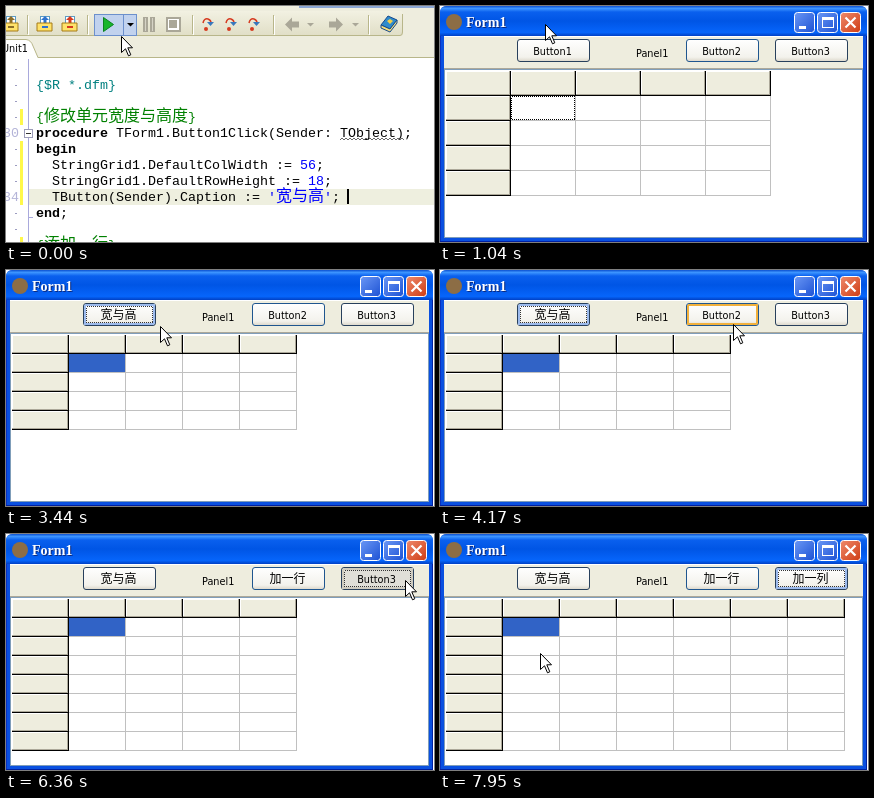
These frames come from a looping animation (428x236 px, 8 s). An HTML page:

```html
<!DOCTYPE html>
<html lang="zh">
<head>
<meta charset="utf-8">
<title>StringGrid demo</title>
<style>
html, body { margin: 0; width: 100%; height: 100%; overflow: hidden; background: #fff; }
svg { display: block; width: 100%; height: 100%; }
rect { shape-rendering: crispEdges; }
rect.soft { shape-rendering: auto; }
.code { font: 13.33px "Liberation Mono", monospace; }
.code .cjk { font: 16px "Noto Sans CJK SC", "Noto Sans CJK", sans-serif; }
.ui { font: 9.7px "DejaVu Sans", sans-serif; }
.ui.cjk { font: 12px "Noto Sans CJK SC", "Noto Sans CJK", sans-serif; }
.title { font: bold 14px "Liberation Serif", serif; }
.key { font-weight: bold; }
.lit { fill: #00f; }
.note { fill: #008000; }
.dir { fill: #008080; }
.num { fill: #b4b4d8; }
</style>
</head>
<body>
<svg viewBox="0 0 428 236" preserveAspectRatio="none">
  <defs>
    <linearGradient id="bar" x2="0" y2="1"><stop stop-color="#f2f1e2"/><stop offset="1" stop-color="#e0dec6"/></linearGradient>
    <linearGradient id="caption" x2="0" y2="1">
      <stop stop-color="#0a4fd0"/><stop offset=".08" stop-color="#3d95ff"/><stop offset=".2" stop-color="#0a60ee"/>
      <stop offset=".5" stop-color="#0055e5"/><stop offset=".88" stop-color="#0665fb"/><stop offset="1" stop-color="#0040c4"/>
    </linearGradient>
    <linearGradient id="face" x2="0" y2="1"><stop stop-color="#fff"/><stop offset=".8" stop-color="#f3f2ec"/><stop offset="1" stop-color="#dcd7ca"/></linearGradient>
    <linearGradient id="blueBox" x2="1" y2="1"><stop stop-color="#6a97f5"/><stop offset="1" stop-color="#1d52d4"/></linearGradient>
    <linearGradient id="redBox" x2="1" y2="1"><stop stop-color="#ee8a6c"/><stop offset="1" stop-color="#cf3c14"/></linearGradient>
  </defs>
  <g id="scene"></g>
  <path id="cursor" d="M.5.5V16.5L4.5 12.8L7.5 19.8L9.8 18.8L6.8 11.8H11.5Z" fill="#fff" stroke="#000"/>
</svg>
<script>
const LOOP = 8000;
const PANEL = '#eeedde';
const OLIVE = '#b8b68a';
const GREY = '#aaa798';
const sceneNode = document.getElementById('scene');
const cursorNode = document.getElementById('cursor');

const rect = (x, y, w, h, fill, extra = '') =>
  `<rect x="${x}" y="${y}" width="${w}" height="${h}" fill="${fill}" ${extra}/>`;
const path = (d, fill, extra = '') => `<path d="${d}" fill="${fill}" ${extra}/>`;
const line = (d, stroke, extra = '') => path(d, 'none', `stroke="${stroke}" ${extra}`);
const text = (x, y, cls, content, extra = '') =>
  `<text x="${x}" y="${y}" class="${cls}" ${extra}>${content}</text>`;
const span = (cls, content) => `<tspan class="${cls}">${content}</tspan>`;
const repeat = (n, draw) => Array.from({ length: n }, (_, i) => draw(i)).join('');

// Pointer moves: start, end, step count, from, control, to
const moves = [
  [200, 200, 1, [115, 30], [110, 24], [105, 18]],
  [1370, 1730, 7, [105, 18], [125, 30], [144, 47]],
  [1990, 2120, 2, [144, 47], [144, 48], [143, 48]],
  [3440, 4230, 13, [143, 48], [215, 101], [307, 46]],
  [5800, 6100, 6, [307, 46], [353, 42], [399, 46]],
  [7350, 7950, 11, [399, 46], [240, 180], [100, 119]]
];

function pointer(t) {
  const move = moves.filter(m => t >= m[0]).pop();
  if (!move) return moves[0][3];
  const [start, end, steps, a, b, c] = move;
  const step = end > start ? Math.floor((t - start) / (end - start) * (steps - 1) + 1e-6) + 1 : 1;
  const u = Math.min(step, steps) / steps, v = 1 - u;
  return [0, 1].map(i => Math.round(v * v * a[i] + 2 * u * v * b[i] + u * u * c[i]));
}

// Each click: press time, release time, button index
const clicks = [
  [2380, 2440, 0], [4430, 4560, 1], [5020, 5080, 1],
  [5410, 5470, 1], [6360, 6420, 2], [6820, 6950, 2]
];
const buttons = [
  { x: 77, before: 'Button1', after: '宽与高', edge: '#28405c' },
  { x: 246, before: 'Button2', after: '加一行', edge: '#1f568f' },
  { x: 335, before: 'Button3', after: '加一列', edge: '#28405c' }
];

function folder(x, badge) {
  return rect(x + 3.5, 10.5, 9, 8, '#fff', 'stroke="#5b9ac4"') +
    path(`M${x + 8} 10l4 4h-2.5v4h-3v-4h-2.5z`, badge) +
    path(`M${x} 17h15v8h-15z`, '#ffe26a', 'stroke="#a57a18"') +
    rect(x + 5, 20, 6, 2, badge);
}

function stepIcon(x, running) {
  const ink = running ? GREY : '#3978bd', dot = running ? GREY : '#d63a20';
  return line(`M${x + 2} 17q1-5 5-4q3 1 3 4`, dot, 'stroke-width="1.5"') +
    path(`M${x + 6} 16h7l-3.5 4z`, ink) + `<circle cx="${x + 5}" cy="23" r="2" fill="${dot}"/>`;
}

function toolbar(t) {
  const running = t >= 780;
  const hot = running ? '#b4c5e0' : t >= 260 ? '#98b5e2' : '#c1d2ee';
  const pause = running ? '#2f78cf' : GREY;
  const sep = x => rect(x, 9, 1, 19, OLIVE) + rect(x + 1, 10, 1, 19, '#fff');
  const caret = x => path(`M${x} 17h7l-3.5 3.5z`, GREY);
  return rect(0, 0, 428, 52, PANEL) + rect(293, 0, 135, 2, '#8ba6d4') +
    rect(-5, 5, 402, 25, 'url(#bar)', 'rx="3" class="soft"') + line('M0 29.5H394Q396.5 29.5 396.5 26V8', OLIVE) +
    folder(-3, '#8c6d28') + sep(21) + folder(31, '#2f72cc') + folder(56, '#d63a20') + sep(81) +
    rect(88.5, 8.5, 42, 21, hot, 'stroke="#6c90cc"') + rect(117, 9, 1, 20, '#6c90cc') +
    path('M97.5 11.5v14l10-7z', running ? '#929dab' : '#18b52b', `stroke="${running ? '#7f8b9b' : '#0b8220'}"`) +
    path('M121 17h7l-3.5 3.5z', running ? '#8a94a5' : '#000') +
    [137, 144].map(x => rect(x, 11, 5, 15, pause) + rect(x + 2, 12, 1, 13, running ? '#8ac4f0' : '#d6d3c6')).join('') +
    rect(160.5, 11.5, 13, 13, '#fff', `stroke="${running ? '#222' : GREY}" stroke-width="${running ? 1 : 2}"`) +
    rect(163, 14, 8, 8, running ? '#e5231b' : GREY) + sep(186) +
    [195, 218, 241].map(x => stepIcon(x, running)).join('') + sep(267) +
    path('M279 18.5l7-7v4h7v6h-7v4z', GREY) + caret(301) +
    path('M337 18.5l-7-7v4h-7v6h7v4z', GREY) + caret(346) + sep(362) +
    path('M375 19l7-9l9 4l-7 9z', '#2f8bcc', 'stroke="#164a8c"') +
    path('M375 19l9 4l7-9v3l-7 9l-9-4z', '#f7df7c', 'stroke="#164a8c"') +
    path('M381 15l3-2l3 2l-3 3z', '#f3cf48') +
    rect(0, 51, 428, 1, OLIVE) + path('M0 33.5H20Q25 34 27 40L32 52H0Z', '#fff') +
    line('M0 33.5H20Q25 34 27 40L32 51.5', OLIVE) + text(-4, 46, 'ui', 'Unit1');
}

function editor() {
  const row = (n, x, content) => text(x, 131 + (n - 30) * 16, 'code', content);
  const cjk = s => span('cjk', s);
  let squiggle = 'M334 134';
  for (let i = 0; i < 16; i++) squiggle += 'l2 -2l2 2';
  return rect(23, 183, 405, 16, '#eeefdf') + rect(22, 53, 1, 183, '#a9a9dc') +
    rect(14, 103, 3, 16, '#fff84a') + rect(14, 135, 3, 64, '#fff84a') + rect(14, 231, 3, 5, '#fff84a') +
    repeat(11, i => i === 4 || i === 8 ? '' : rect(9, 63 + i * 16, 2, 1, '#9c9cc0')) +
    row(30, -3, span('num', '30')) + row(34, -3, span('num', '34')) +
    rect(22, 211, 5, 1, '#a9a9dc') +
    rect(18.5, 123.5, 8, 8, '#fff', 'stroke="#9c9cb8"') + rect(20, 127, 5, 1, '#333') +
    row(27, 30, span('dir', '{$R *.dfm}')) +
    row(29, 30, span('note', '{' + cjk('修改单元宽度与高度') + '}')) +
    row(30, 30, span('key', 'procedure') + ' TForm1.Button1Click(Sender: TObject);') +
    line(squiggle, '#444', 'stroke-width=".8"') +
    row(31, 30, span('key', 'begin')) +
    row(32, 46, 'StringGrid1.DefaultColWidth := ' + span('lit', '56') + ';') +
    row(33, 46, 'StringGrid1.DefaultRowHeight := ' + span('lit', '18') + ';') +
    row(34, 46, 'TButton(Sender).Caption := ' + span('lit', "'" + cjk('宽与高') + "'") + ';') +
    rect(341, 183, 2, 15, '#000') +
    row(35, 30, span('key', 'end') + ';') +
    row(37, 30, span('note', '{' + cjk('添加一行') + '}'));
}

const ide = t => rect(0, 0, 428, 236, '#fff') + toolbar(t) + (t >= 520 && t < 780 ? '' : editor());

function button({ x, before, after, edge }, { done, down, hot, focus }) {
  const label = done ? after : before;
  const ring = down ? '#cfccc0' : hot ? '#f2b13c' : focus ? '#9dbbed' : '';
  return rect(x + .5, 33.5, 72, 22, down ? '#e0dfd8' : 'url(#face)', `rx="2.5" stroke="${edge}" class="soft"`) +
    (ring ? rect(x + 2, 35, 69, 19, 'none', `rx="1" stroke="${ring}" stroke-width="2"`) : '') +
    (focus ? rect(x + 3.5, 36.5, 66, 16, 'none', 'stroke="#333" stroke-dasharray="1 1"') : '') +
    text(x + 35.5, 49, done ? 'ui cjk' : 'ui', label, 'text-anchor="middle"');
}

function grid(cols, rows, w, h, focused) {
  const left = 6, top = 65, dx = w + 1, dy = h + 1;
  const width = cols * dx, height = rows * dy;
  const fixed = (x, y) => rect(x, y, dx, dy, '#000') + rect(x, y, w, h, '#aca899') +
    rect(x, y, w - 1, h - 1, '#fff') + rect(x + 1, y + 1, w - 2, h - 2, PANEL);
  const cellX = left + dx, cellY = top + dy;
  return repeat(cols - 1, i => rect(left + dx * (i + 2) - 1, cellY, 1, height - dy, '#c0c0c0')) +
    repeat(rows - 1, i => rect(cellX, top + dy * (i + 2) - 1, width - dx, 1, '#c0c0c0')) +
    repeat(cols, i => fixed(left + dx * i, top)) +
    repeat(rows - 1, i => fixed(left, cellY + dy * i)) +
    (focused
      ? rect(cellX + .5, cellY + .5, w - 1, h - 1, '#fff', 'stroke="#000" stroke-dasharray="1 1"')
      : rect(cellX, cellY, w, h, '#3163c6'));
}

const captionBox = (x, fill, glyph) =>
  rect(x - .5, 6.5, 20, 20, fill, 'rx="3" stroke="#fff" class="soft"') + glyph;

function form(t, [px, py]) {
  const released = i => clicks.filter(c => c[2] === i && t >= c[1]).length;
  const last = clicks.filter(c => t >= c[0]).pop();
  const focus = last ? last[2] : -1;
  const pressed = last && t < last[1] ? last[2] : -1;
  const resized = released(0) > 0;
  return rect(0, 0, 428, 236, '#fff') +
    path('M0 236V7Q0 0 7 0H420Q427 0 427 7V236Z', '#0a50e0') +
    path('M0 30V7Q0 0 7 0H420Q427 0 427 7V30Z', 'url(#caption)') +
    rect(0, 30, 1, 206, '#0831c0') + rect(426, 30, 1, 206, '#0020a0') + rect(0, 235, 427, 1, '#0020a0') +
    '<circle cx="14" cy="16" r="8" fill="#8c6d45"/>' +
    text(27, 22, 'title', 'Form1', 'fill="#0a2a80"') + text(26, 21, 'title', 'Form1', 'fill="#fff"') +
    captionBox(355, 'url(#blueBox)', rect(359, 20, 7, 3, '#fff')) +
    captionBox(378, 'url(#blueBox)', rect(382.5, 11.5, 11, 10, 'none', 'stroke="#fff"') + rect(382, 11, 12, 3, '#fff')) +
    captionBox(401, 'url(#redBox)', line('M405.5 11.5l10 10M415.5 11.5l-10 10', '#fff', 'stroke-width="2.2"')) +
    rect(4, 30, 419, 202, '#fff') + rect(4, 30, 419, 33, PANEL) + rect(4, 30, 419, 1, '#fff') +
    rect(4, 62, 419, 1, '#aca899') + rect(4.5, 63.5, 418, 168, '#fff', 'stroke="#7f9db9"') +
    text(196, 51, 'ui', 'Panel1') +
    buttons.map((b, i) => button(b, {
      done: released(i) > 0,
      down: pressed === i,
      focus: focus === i,
      hot: px >= b.x && px < b.x + 73 && py >= 33 && py < 56
    })).join('') +
    grid(5 + released(2), 5 + released(1), resized ? 56 : 64, resized ? 18 : 24, focus < 0);
}

let shown = '';
function frame(now) {
  const t = now % LOOP;
  const at = pointer(t);
  const markup = t < 1040 ? ide(t) : form(t, at);
  if (markup !== shown) sceneNode.innerHTML = shown = markup;
  cursorNode.setAttribute('transform', `translate(${at})`);
}

const origin = performance.now();
function tick() {
  frame(performance.now() - origin);
  requestAnimationFrame(tick);
}
tick();
</script>
</body>
</html>
```
